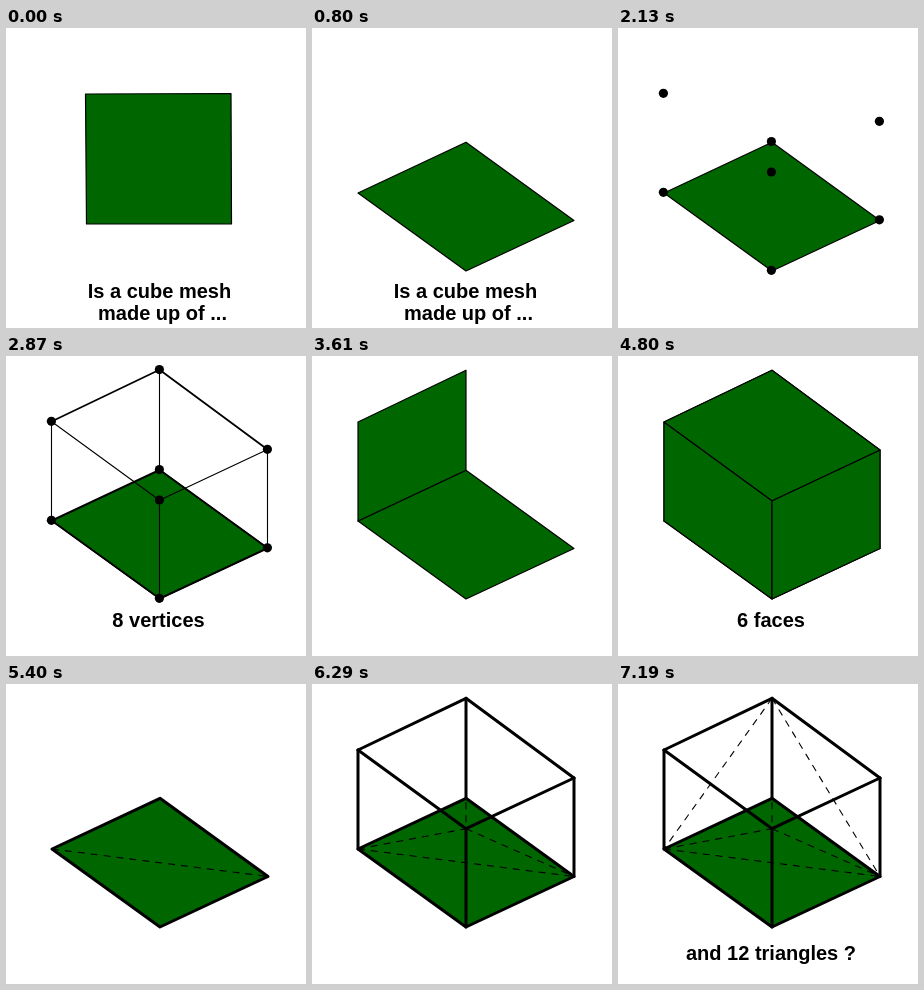
Recreate the animation shown at these times as an HTML page. Size 300 by 300 pixels, loop 8 s.

```html
<!DOCTYPE html>
<html lang="en">
<head>
<meta charset="utf-8">
<title>Cube mesh</title>
<style>
  html, body { margin: 0; width: 100%; height: 100%; overflow: hidden; background: #fff; }
  svg { display: block; width: 100vw; height: 100vh; }
  text { font: bold 20px "Liberation Sans", Arial, sans-serif; text-anchor: middle; }
  polygon { fill: #006600; stroke: #000; stroke-width: 1.2; stroke-linejoin: round; }
  line { stroke: #000; stroke-width: 1.1; stroke-linecap: round; }
  .mid { stroke-width: 1.8; }
  .bold { stroke-width: 3; }
  .dash { stroke-dasharray: 7 6; stroke-linecap: butt; }
</style>
</head>
<body>
<svg id="stage" viewBox="0 0 300 300"></svg>
<script>
const LOOP = 8000;
const stage = document.getElementById('stage');
const items = [];

// Cube corners: lower ring, then upper ring (left, front, right, back)
const V = {
  l: [46, 165], f: [154, 243], r: [262, 192.5], b: [154, 114.3],
  L: [46, 66], F: [154, 144.7], R: [262, 94], B: [154, 14.3]
};

function add(from, to, tag, attrs, label) {
  const el = document.createElementNS('http://www.w3.org/2000/svg', tag);
  for (const k in attrs) el.setAttribute(k, attrs[k]);
  if (label) el.textContent = label;
  stage.append(el);
  items.push({ el, from, to });
}

const poly = (from, to, pts, cls = '') =>
  add(from, to, 'polygon', { points: pts.join(' '), class: cls });
const face = (from, to, keys, cls) =>
  poly(from, to, [...keys].map(k => V[k]), cls);
const text = (from, to, x, y, label) => add(from, to, 'text', { x, y }, label);

function edge(from, to, [p, q], cls = '', shift = 0) {
  const [x1, y1] = V[p], [x2, y2] = V[q];
  add(from, to, 'line', {
    x1: x1 + shift, y1: y1 + shift, x2: x2 + shift, y2: y2 + shift, class: cls
  });
}

// Square turning into the base of the cube
const square = [[79.5, 66], [225, 65.5], [225.5, 196], [80.5, 196]];
const base = ['l', 'b', 'r', 'f'].map(k => V[k]);
const turned = k => square.map(([x, y], i) =>
  [x + (base[i][0] - x) * k, y + (base[i][1] - y) * k]);
poly(0, 500, turned(0));
poly(500, 650, turned(1 / 3));
poly(650, 800, turned(2 / 3));
poly(800, 5400, base);
poly(5400, LOOP, base, 'bold');
text(0, 950, 153.5, 270, 'Is a cube mesh');
text(0, 950, 156.5, 292, 'made up of ...');

// Vertices
const rings = ['lb', 'br', 'lf', 'fr', 'LB', 'BR', 'LF', 'FR'];
const posts = ['lL', 'fF', 'rR', 'bB'];
for (const e of rings) edge(2570, 3610, e, /F/.test(e) ? '' : 'mid', -0.5);
for (const e of posts) edge(2570, 3610, e, '', -0.5);
const dots = { l: 950, f: 1090, r: 1240, b: 1540, F: 1690, L: 1990, R: 2130, B: 2430 };
for (const k in dots) {
  add(dots[k], 3610, 'circle', { cx: V[k][0] - 0.6, cy: V[k][1] - 0.7, r: 4.6 });
}
text(2870, 3610, 152.5, 271, '8 vertices');

// Faces
face(3610, 5400, 'LBbl');
face(3910, 5400, 'BRrb');
face(4210, 5400, 'LFfl');
face(4510, 5400, 'FRrf');
face(4650, 5400, 'LBRF');
text(4800, 5400, 153, 271, '6 faces');

// Triangles
for (const e of [...rings.slice(4), ...posts]) edge(5690, LOOP, e, 'bold');
const splits = { lr: 5400, BF: 5840, lF: 6290, Fr: 6290, Br: 6440, Bl: 6890 };
for (const e in splits) edge(splits[e], LOOP, e, 'dash');
text(7190, LOOP, 153, 276, 'and 12 triangles ?');

function draw() {
  const t = performance.now() % LOOP;
  for (const { el, from, to } of items) {
    el.style.display = t >= from && t < to ? '' : 'none';
  }
  requestAnimationFrame(draw);
}
draw();
</script>
</body>
</html>
```
